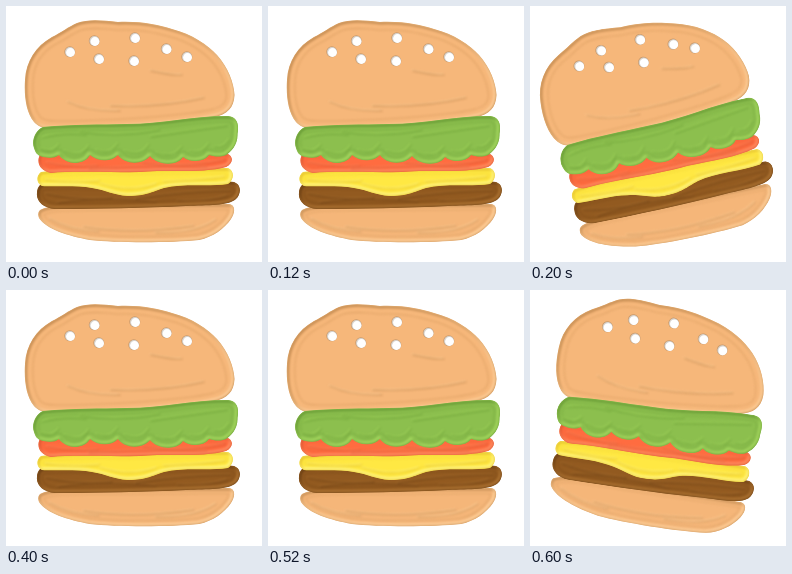
These frames come from a looping animation (256x256 px, 0.8 s). An HTML page:

```html
<!DOCTYPE html>
<html lang="en">
<head>
<meta charset="utf-8">
<title>Rocking burger</title>
<style>
  html, body { margin: 0; width: 100%; height: 100%; overflow: hidden; background: #fff; }
  svg { display: block; width: 100vw; height: 100vh; }
  #burger { transform-origin: 128px 128px; }
  path { stroke-linecap: round; stroke-linejoin: round; }
</style>
</head>
<body>
<svg viewBox="0 0 256 256">
  <defs>
    <filter id="soft" x="-10%" y="-20%" width="120%" height="140%" color-interpolation-filters="sRGB">
      <feGaussianBlur stdDeviation=".8"/>
    </filter>
  </defs>
  <g id="burger"></g>
</svg>
<script>
const burger = document.getElementById('burger');

// Bottom to top: fill, shade, light, outline, grooves
const layers = [
  { fill: '#f5b679', dark: '#c08a50', light: '#ffd09a',
    d: 'M34 204C45 198 70 199 100 199C145 199 190 198 223 198C230 199 229 207 225 213C218 223 207 231 193 234C165 237 110 237 84 234C62 230 40 223 33 212Q31 207 34 204Z',
    grooves: 'M44 213Q63 224 93 226M78 221Q128 229 188 220M150 227Q190 228 210 214' },
  { fill: '#925a20', dark: '#60370f', light: '#ae7433',
    d: 'M34 179C55 175 95 178 120 178C160 177 200 174 228 176C236 179 235 188 230 193C222 200 202 199 180 200C140 202 90 203 49 203C37 202 30 195 31 187Q31 182 34 179Z',
    grooves: 'M40 188Q72 195 106 192M52 197Q96 190 150 196M130 193Q182 185 225 185M172 195Q202 196 221 190' },
  { fill: '#ffe843', dark: '#e2bd24', light: '#fff684',
    d: 'M35 166C70 161 100 164 130 163C165 162 195 162 222 162C229 165 228 174 222 178C202 181 178 177 158 182C145 186 140 190 122 190C106 189 101 184 86 182C70 179 48 181 36 180C30 177 30 170 35 166Z',
    grooves: 'M40 174Q65 178 94 175M95 178Q123 187 151 178M158 176Q191 175 219 171' },
  { fill: '#ff6c40', dark: '#d9502c', light: '#ff8d62',
    d: 'M35 147C80 142 175 144 219 147C228 149 228 157 220 161C202 166 176 165 151 165C112 168 74 164 45 167C34 165 29 156 35 147Z',
    grooves: 'M41 157Q65 162 92 160M83 163Q143 159 201 161M137 157Q176 163 219 154' },
  { fill: '#f6b77a', dark: '#b98046', light: '#ffd09a', rim: 15,
    d: 'M28 116C20 106 18 90 19 74C20 55 30 40 46 31C56 26 62 21 71 17C82 13 95 14 112 16C136 15 152 19 166 23C186 28 202 39 211 49C222 61 228 77 228.5 89C228 102 221 108 209 111C180 118 105 123 50 123C36 123 32 120 28 116Z',
    grooves: 'M62 96Q82 106 114 105M105 100Q155 102 198 92M145 65Q168 70 176 69' },
  { fill: '#8cbf4e', dark: '#5f922f', light: '#a6d95f',
    d: 'M37 121C70 118 92 119 121 118C157 118 185 110 222 110C232 111 233 119 231.5 128C232 139 225 146 220 149C213 152 207 150 203 149C199 156 184 157 177 151C172 160 152 160 144 150C137 159 119 159 112 149C106 156 92 156 84 149C79 159 61 160 53 149C48 153 40 152 34 150C30 148 29 145 28 142C25 134 30 124 37 121Z',
    grooves: 'M36 132Q57 126 80 129M74 126Q114 132 154 124M145 131Q185 125 221 120M35 143Q47 148 53 139M59 145Q75 153 83 140M91 144Q104 150 112 138M119 145Q135 152 143 139M151 147Q168 153 176 141M184 145Q196 149 203 138M209 141Q218 143 223 134' }
];

const seeds = [[64, 46], [88.5, 35], [129, 32], [160.5, 43], [181, 51], [93, 53], [128, 55]];

const line = (d, color, width, opacity, shift = 0) =>
  `<path d="${d}" fill="none" stroke="${color}" stroke-width="${width}" opacity="${opacity}" transform="translate(${shift} ${shift})"/>`;

// Lit from the lower right, with a raised rim inside the outline
function layer({ fill, dark, light, d, grooves, rim = 10 }, i) {
  return `<clipPath id="c${i}"><path d="${d}"/></clipPath>
    <g clip-path="url(#c${i})">
      <path d="${d}" fill="${fill}"/>
      <g filter="url(#soft)">
        ${line(d, dark, rim + 2, .35)}
        ${line(d, fill, rim, 1)}
        ${line(d, light, 4, .8, -1)}
        ${line(d, dark, 3.4, .75, .7)}
        ${line(d, light, 2, .7, -1.2)}
        ${line(grooves, light, 1.4, .7, -.9)}
        ${line(grooves, dark, 1.3, .5)}
      </g>
    </g>`;
}

const seed = ([x, y]) =>
  `<circle cx="${x - .2}" cy="${y - .2}" r="5.5" fill="#c99a6c"/>
   <circle cx="${x}" cy="${y}" r="5" fill="#d8d4cf"/>
   <circle cx="${x + .5}" cy="${y + .5}" r="4.4" fill="#fff"/>`;

burger.innerHTML = layers.map(layer).join('') + seeds.map(seed).join('');

const poses = [0, -11.3, 0, 9];
const hold = 200;
let shown = -1;

function draw(now) {
  const step = Math.floor(now / hold) % poses.length;
  if (step !== shown) {
    burger.style.transform = `rotate(${poses[step]}deg)`;
    shown = step;
  }
  requestAnimationFrame(draw);
}
draw(performance.now());
</script>
</body>
</html>
```
